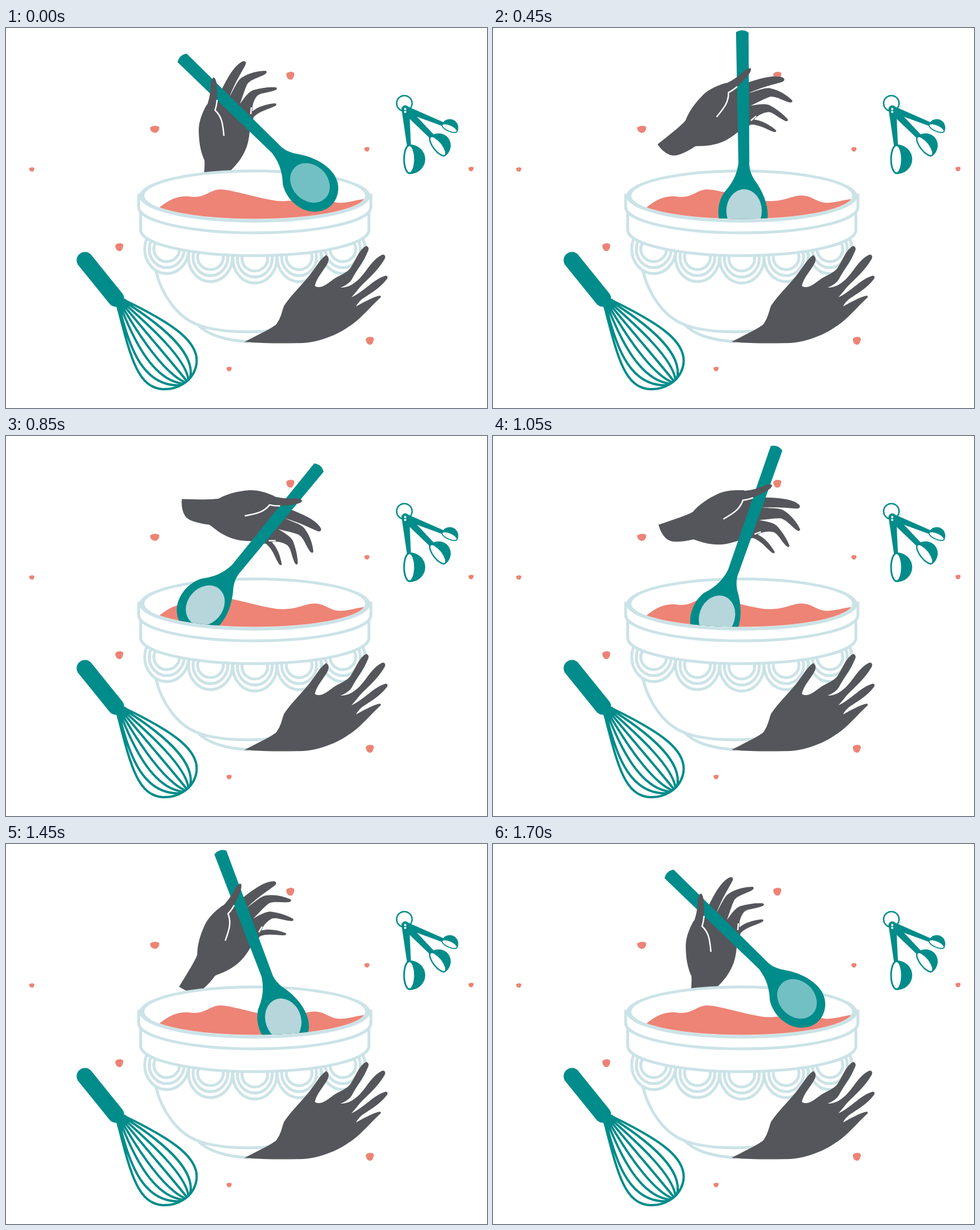
An HTML page for the animation above (1.75 s loop, 841 by 666 pixels).

```html
<!DOCTYPE html>
<html lang="en">
<head>
<meta charset="utf-8">
<title>Stirring</title>
<style>
  html, body { margin: 0; width: 100%; height: 100%; overflow: hidden; background: #fff; }
  svg { display: block; width: 100%; height: 100%; }
  .teal { fill: #008c8a; }
  .skin { fill: #55565b; }
  .coral { fill: #ed8476; }
  .wire { fill: none; stroke: #008c8a; stroke-width: 4; }
  .glaze { fill: #fff; stroke: #cbe3e7; stroke-width: 5; }
  .line { fill: none; stroke: #cbe3e7; stroke-width: 5; }
</style>
</head>
<body>
<svg viewBox="0 0 841 666">
  <defs>
    <path id="blob" d="M-7-3C-5-7 3-8 6.500-5C8-2 6 4 3 6.500C0 8-5 6-6 2C-6.500 0-7-1-7-3Z"/>
    <g id="scallop">
      <ellipse rx="38.500" ry="43"/><ellipse rx="30.500" ry="32.500"/><ellipse rx="22.500" ry="22"/>
    </g>
    <g id="cup">
      <path class="teal" d="M0-26A27.500 26 0 0 1 0 26Z"/>
      <ellipse rx="9.500" ry="24.500" fill="#fff" stroke="#008c8a" stroke-width="3"/>
    </g>
    <clipPath id="inBowl"><path d="M0 0H841V294H628A193 40.500 0 0 1 242 294H0Z"/></clipPath>
  </defs>

  <g id="crumbs" class="coral"></g>

  <!-- hand behind the bowl -->
  <g class="stir">
    <path class="skin" d="M342 296C345 268 348 245 347 232C340 216 337 200 337 177
      C338 160 344 148 350 136L378 106C388 86 400 64 415 58Q421 58 419 64C412 78 403 90 391 120
      C397 110 404 92 412 87C424 79 440 75 454 75Q458 77 453 81C442 87 428 90 422 98
      C417 108 414 120 409 133C417 122 424 112 432 109C446 105 460 103 472 104Q476 106 471 109
      C458 114 446 113 439 119C432 128 430 138 431 146C440 138 456 133 471 132Q475 134 470 137
      C458 143 444 145 433 156L426 182C424 202 420 214 411 228C404 239 396 246 391 252
      Q388 268 382 281Q378 290 370 294Q358 299 342 296Z"/>
    <path d="M429 139L428 151" stroke="#fff" stroke-width="2.500"/>
  </g>

  <!-- bowl -->
  <g id="scallops" class="line"></g>
  <path class="line" d="M262 426C272 466 298 506 335 520C368 533 424 535 470 530M335 520C354 539 384 547 424 550"/>
  <path class="glaze" d="M235.500 318V354A199.500 45 0 0 0 634.500 354V318Z"/>
  <path class="glaze" d="M232 293V314A203 45 0 0 0 638 314V293Z"/>
  <ellipse cx="435" cy="294.500" rx="202" ry="46.500" fill="#cbe3e7"/>
  <ellipse cx="435" cy="294" rx="193" ry="41" fill="#fff"/>

  <g clip-path="url(#inBowl)">
    <path class="coral" d="M269 314C290 297 306 293 326 296C350 297 355 284 374 283
      C394 283 436 297 470 302.500C508 307 520 293 541 293.500C560 295 566 306 584 306.500
      C600 306 614 301 630 299V340H269Z"/>
    <g class="stir">
      <path class="teal" d="M300 60C302 51 308 46 316 45L477 204C484 212 493 217 505 220
        C543 225 581 248 581 281C580 307 562 322 539 322C515 322 490 301 484 274
        C483 252 478 236 465 219Z"/>
      <ellipse id="hollow" cx="531.500" cy="271.500" rx="31" ry="38" transform="rotate(-45 531.500 271.500)"/>
      <path class="skin" d="M347 146C354 132 357 118 358 102C358 93 361 86 364 87C370 92 369 112 369 128L366 146Z"/>
      <path d="M369 126Q368 137 365.500 144C377 155 379 166 381 189" fill="none" stroke="#fff" stroke-width="2.500"/>
    </g>
  </g>

  <!-- supporting hand -->
  <path class="skin" d="M417 550C440 538 458 530 472 520C481 508 482 498 486 487C500 466 521 447 534 429
    C544 416 551 403 560 398Q566 402 563 411C556 425 543 437 540 452C550 459 562 448 573 440
    C584 433 595 430 602 421C612 406 618 387 630 382Q636 384 633 391C626 409 613 424 605 440
    Q600 449 585 455C598 455 607 449 615 442C630 429 640 404 659 397Q665 398 662 405
    C650 426 632 440 619 454Q611 464 604 472C626 462 644 439 664 434Q669 435 666 440
    C654 456 636 466 624 474Q616 480 612 488C627 480 640 472 654 469Q657 471 653 474
    C641 485 631 497 619 508C593 532 557 549 521 552C485 553 450 553 417 550Z"/>

  <!-- whisk -->
  <path d="M138 407L192 474" stroke="#008c8a" stroke-width="29" stroke-linecap="round"/>
  <path class="teal" d="M192 487L208 474L214 480L197 495Z"/>
  <path id="wires" class="wire" d="M207 477C292 518 343 552 332 594C325 620 300 634 274 633C230 630 218 578 195 488"/>

  <!-- measuring spoons -->
  <circle cx="696.500" cy="132" r="13.500" class="wire" style="stroke-width:2.500"/>
  <path class="teal" d="M691.500 142L705 140L708 206H701ZM693 147L702 138L751 190L744 196ZM698 148L701 137L769 167L766 173Z"/>
  <circle class="teal" cx="698" cy="142" r="6.500"/>
  <circle cx="698" cy="142" r="2" fill="#fff"/><circle cx="698" cy="147" r="2" fill="#fff"/>
  <use href="#cup" transform="translate(705.500 230)"/>
  <use href="#cup" transform="translate(755 207) rotate(-38) scale(.84)"/>
  <use href="#cup" transform="translate(775.500 175.500) rotate(-66) scale(.58)"/>
</svg>
<script>
  const $ = id => document.getElementById(id);

  // x, y, x scale, y scale
  const crumbs = [
    [45, 248, .65, .55], [260, 177.5, 1.15, .88], [497, 83.5, 1, 1], [198, 384, 1, 1],
    [631, 212.5, .65, .57], [813, 247, .65, .57], [390, 597.5, .65, .57], [636, 548, 1, 1]
  ];
  $('crumbs').innerHTML = crumbs.map(([x, y, sx, sy]) =>
    `<use href="#blob" transform="translate(${x} ${y}) scale(${sx} ${sy})"/>`).join('');

  $('scallops').innerHTML = [[281, 387.5], [589, 387.5], [357.5, 401.5], [512.5, 401.5], [435, 404]]
    .map(([x, y]) => `<use href="#scallop" x="${x}" y="${y}"/>`).join('');

  // Wires fan out from the neck and gather at the tip.
  const mix = (a, b, u) => a + (b - a) * u;
  const right = [206, 479, 268, 518, 332, 568, 322, 613];
  const left = [198, 488, 216, 565, 242, 630, 306, 626];
  const wires = [0, .2, .4, .6, .8, 1].map(u => {
    const [x, y, ...curve] = right.map((r, i) => mix(r, left[i], u));
    return `M${x} ${y}C${curve.join(' ')}`;
  });
  $('wires').setAttribute('d', $('wires').getAttribute('d') + wires.join(''));

  const STEP = 50, STEPS = 35, TURN = 17, DEGREES = 5;
  const stirred = document.querySelectorAll('.stir');
  const start = performance.now();

  function draw() {
    const step = Math.floor((performance.now() - start) / STEP) % STEPS;
    const swing = step <= TURN ? step : 2 * TURN - step;
    stirred.forEach(g => g.setAttribute('transform', `rotate(${swing * DEGREES} 426 184.4)`));
    $('hollow').setAttribute('fill', swing < 2 ? '#72c0c4' : '#b6d6db');
    requestAnimationFrame(draw);
  }
  draw();
</script>
</body>
</html>
```
